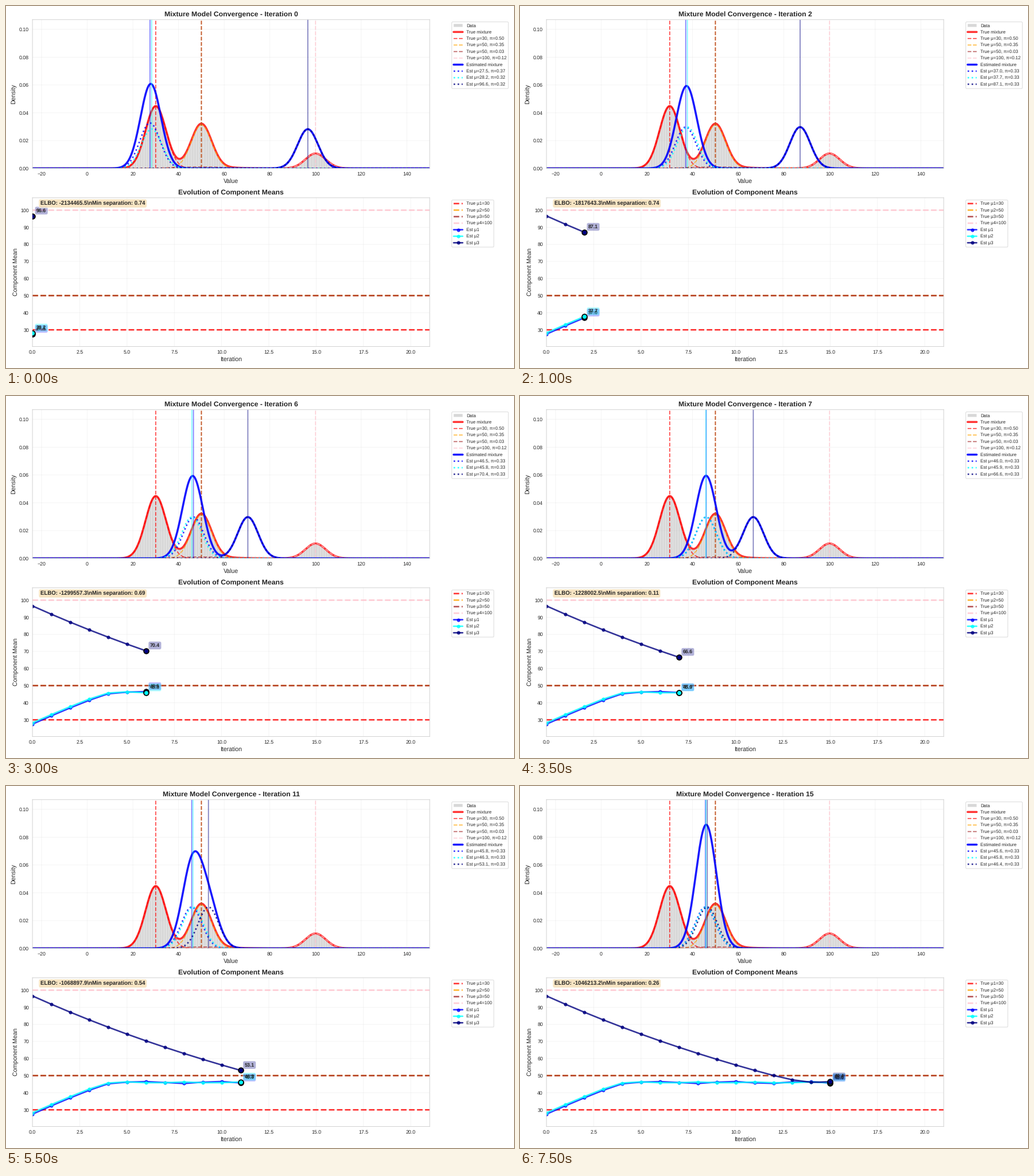
A matplotlib script that plays this animation: 885x632 px, repeating every 8 s.

```python
import numpy as np
import matplotlib.pyplot as plt
from matplotlib.animation import FuncAnimation

W, H, DPI = 885, 632, 63.2
N = 16
SIGMA = np.sqrt(20)
CENTER = 46  # mean of the data, where all estimates end up

INK = "0.15"
plt.rcParams.update({
    "font.family": "Liberation Sans", "font.size": 10, "text.hinting": "none",
    "text.color": INK, "axes.labelcolor": INK, "xtick.color": INK,
    "ytick.color": INK, "xtick.major.size": 0, "ytick.major.size": 0,
    "xtick.major.pad": 7, "ytick.major.pad": 7,
    "axes.edgecolor": "0.8", "axes.linewidth": 1, "axes.axisbelow": True,
    "grid.color": "0.8", "lines.solid_capstyle": "round", "path.snap": False,
})

# True components: mean, weight, sigma, colour
TRUE = [(30, 0.50, SIGMA, "red"), (50, 0.35, SIGMA, "orange"),
        (50, 0.03, 12, "brown"), (100, 0.12, SIGMA, "pink")]
COLORS = ["blue", "cyan", "navy"]


def descend(start, amp, period, peak):
    """Walk to CENTER with shrinking steps, then wobble around it."""
    mu, path = start, []
    for i in range(N):
        near = np.exp(-4 * (mu - CENTER) ** 2)
        path.append(mu + near * amp * np.cos(2 * np.pi * (i - peak) / period))
        mu += 4.86 * 0.958 ** i * np.tanh((CENTER - mu) / 3)
    return path


MEANS = np.array([descend(27.48, 0.6, 3.8, 6),
                  descend(28.22, 0.3, 3, 8),
                  descend(96.62, 0.4, 3, 15)])


def weights(i):
    return 1 / 3 + np.array([0.033, -0.016, -0.017]) * 0.1 ** i


def elbo(i):
    spread = np.mean((MEANS[:, i] - 45.7) ** 2)
    return -1045980 - 1250 * spread + 257500 * 0.05 ** i


def pdf(x, mu, s=SIGMA):
    return np.exp(-0.5 * ((x - mu) / s) ** 2) / (s * np.sqrt(2 * np.pi))


def true_pdf(x):
    return sum(p * pdf(x, mu, s) for mu, p, s, _ in TRUE)


def add_axes(top, bottom, title, xlabel, ylabel, xlim, ylim):
    ax = fig.add_axes([46.1 / W, 1 - bottom / H, 692 / W, (bottom - top) / H])
    ax.set(xlim=xlim, ylim=ylim)
    ax.set_xlabel(xlabel, fontsize=12)
    ax.set_ylabel(ylabel, fontsize=12)
    ax.set_title(title, fontsize=14, fontweight="bold")
    ax.grid(True, alpha=0.3)
    return ax


def add_legend(ax, handles):
    return ax.legend(handles=handles, bbox_to_anchor=(1.05, 1),
                     loc="upper left", fontsize=9)


def label_box(color, alpha):
    return dict(boxstyle="round,pad=0.3", facecolor=color, edgecolor="white",
                alpha=alpha)


fig = plt.figure(figsize=((W + 0.001) / DPI, (H + 0.001) / DPI), dpi=DPI,
                 facecolor="white")

# Density panel
x = np.linspace(-24, 150, 1000)
ax1 = add_axes(23.8, 283.5, "Mixture Model Convergence - Iteration 0",
               "Value", "Density", (-24, 150), (0, 0.107))
ax1.set_xticks(range(-20, 141, 20))
ax1.set_yticks(np.arange(6) * 0.02)

edges = np.linspace(8.6, 117.4, 101)
step = edges[1] - edges[0]
bars = ax1.bar(edges[:-1], true_pdf(edges[:-1] + step / 2), step, align="edge",
               color="gray", edgecolor="white", linewidth=1, alpha=0.3,
               label="Data")
handles = [bars]
handles += ax1.plot(x, true_pdf(x), color="red", lw=4, alpha=0.8,
                    label="True mixture")
for mu, p, s, c in TRUE:
    handles += ax1.plot(x, p * pdf(x, mu, s), "--", color=c, lw=2, alpha=0.7,
                        label=f"True μ={mu}, π={p:.2f}")
    ax1.axvline(mu, color=c, ls="--", lw=2, alpha=0.7)

mixture, = ax1.plot(x, 0 * x, color="blue", lw=4, alpha=0.9,
                    label="Estimated mixture")
handles.append(mixture)
curves, vlines = [], []
for c in COLORS:
    curves += ax1.plot(x, 0 * x, ":", color=c, lw=3, alpha=0.8,
                       label="Est μ=00.0, π=0.00")
    vlines.append(ax1.axvline(0, color=c, lw=2, alpha=0.5))
legend = add_legend(ax1, handles + curves)
est_labels = legend.get_texts()[-3:]

# Trajectory panel
ax2 = add_axes(334.8, 594.5, "Evolution of Component Means",
               "Iteration", "Component Mean", (0, 21), (20.23, 107.25))
ax2.set_xticks(np.arange(0, 20.1, 2.5))
ax2.set_yticks(range(30, 101, 10))

handles = [ax2.axhline(mu, color=c, ls="--", lw=3, alpha=0.8,
                       label=f"True μ{k}={mu}")
           for k, (mu, _, _, c) in enumerate(TRUE, 1)]
paths, heads, tags = [], [], []
for k, c in enumerate(COLORS, 1):
    paths += ax2.plot([], [], "o-", color=c, lw=3, ms=6, alpha=0.8,
                      label=f"Est μ{k}")
    heads.append(ax2.scatter([0], [0], s=100, color=c, edgecolors="black",
                             linewidths=2, zorder=5))
    tags.append(ax2.annotate("", (0, 50), xytext=(8, 8),
                             textcoords="offset points", fontsize=10,
                             fontweight="bold", bbox=label_box(c, 0.3)))
add_legend(ax2, handles + paths)
info = ax2.text(0.02, 0.98, "", transform=ax2.transAxes, va="top",
                fontsize=11, fontweight="bold", bbox=label_box("wheat", 0.8))


def update(i):
    mus, total = MEANS[:, i], 0
    for k, (mu, p) in enumerate(zip(mus, weights(i))):
        y = p * pdf(x, mu)
        total = total + y
        curves[k].set_ydata(y)
        vlines[k].set_xdata([mu, mu])
        est_labels[k].set_text(f"Est μ={mu:.1f}, π={p:.2f}")
        paths[k].set_data(np.arange(i + 1), MEANS[k, :i + 1])
        heads[k].set_offsets([(i, mu)])
        tags[k].xy = (i, mu)
        tags[k].set_text(f"{mu:.1f}")
    mixture.set_ydata(total)
    ax1.set_title(f"Mixture Model Convergence - Iteration {i}",
                  fontsize=14, fontweight="bold")
    gap = np.diff(np.sort(mus)).min()
    info.set_text(f"ELBO: {elbo(i):.1f}\\nMin separation: {gap:.2f}")
    return []


anim = FuncAnimation(fig, update, frames=N, init_func=lambda: update(0),
                     interval=500, repeat=True, repeat_delay=0, blit=False)
plt.show()
```
